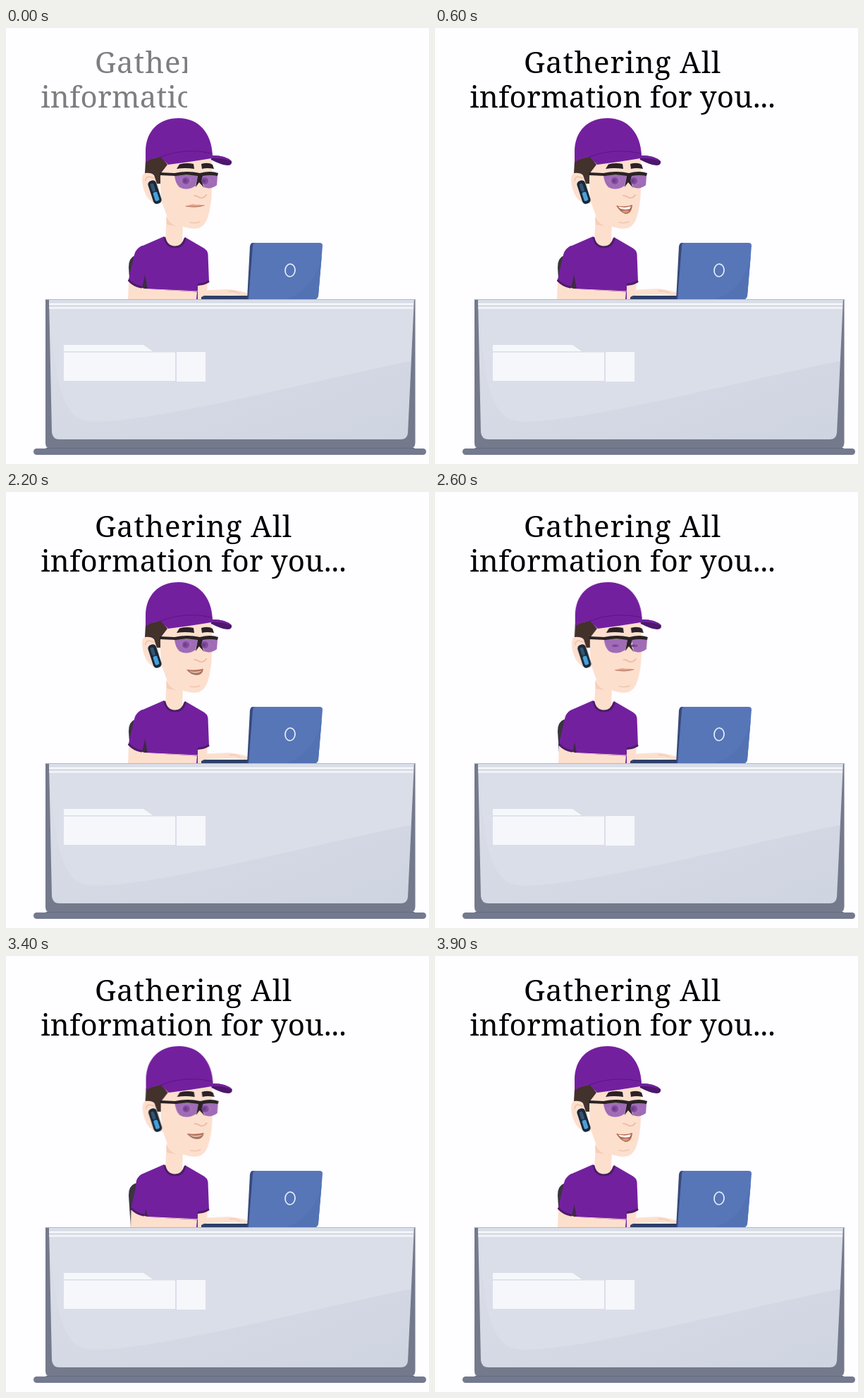
An HTML page without scripts for the animation above (4 s loop, 600 by 619 pixels).

```html
<!DOCTYPE html>
<html lang="en">
<head>
<meta charset="utf-8">
<title>Gathering information</title>
<style>
  html, body { margin: 0; width: 100%; height: 100%; overflow: hidden; background: #fefdff; }
  svg.stage { display: block; width: 600px; height: 619px; }
  .title { font: 42px "Noto Serif", serif; text-anchor: middle; fill: #000; animation: fade 4s infinite; }
  .wipe { animation: wipe 4s infinite; }
  .skin { fill: #fddfce; }
  .shade { fill: #f6cdb8; }
  .shirt { fill: #73209f; }
  .dark { fill: #2a2226; }
  .line { fill: none; stroke-linecap: round; }
  .hem { stroke: #4c1c66; stroke-width: 3; }
  .arm { animation: sway 4s linear infinite; }
  .head { animation: nod 4s linear infinite; }
  .fingers { animation: type .4s step-end infinite; }
  .eyes { transform-origin: 268px 219px; animation: blink 4s step-end infinite; }

  @keyframes wipe {
    0% { transform: translateX(-343px); animation-timing-function: steps(5); }
    12.5%, 100% { transform: none; }
  }
  @keyframes fade {
    0% { opacity: .5; animation-timing-function: steps(5); }
    12.5%, 100% { opacity: 1; }
  }
  @keyframes sway {
    0%, 55% { transform: none; }
    65% { transform: translateX(2px); }
    75%, 85% { transform: translateX(3.5px); }
    97.5% { transform: translateX(1px); }
  }
  @keyframes nod {
    0%, 55% { transform: none; }
    65%, 80% { transform: translateX(.8px); }
    97.5% { transform: none; }
  }
  @keyframes type { 50% { transform: translate(1px, -.7px); } }
  @keyframes blink { 62.5% { transform: scaleY(.35); } 67.5% { transform: none; } }
</style>
</head>
<body>
<svg class="stage" viewBox="0 0 600 619">
  <defs>
    <clipPath id="reveal"><rect class="wipe" width="600" height="130"/></clipPath>
    <linearGradient id="panel" x2="1" y2="1">
      <stop stop-color="#dadee8"/><stop offset="1" stop-color="#cfd4e1"/>
    </linearGradient>
    <path id="lenses" d="M239 209H272L269 224Q257 232 246 226Q240 220 239 209zM278 209H300L299 223Q290 230 281 226z"/>
    <g id="eye">
      <ellipse rx="9" ry="6" fill="#b78bc4"/>
      <circle r="5" fill="#7d4a98"/>
      <circle cx="-1" r="2.4" fill="#5d3078"/>
    </g>
  </defs>

  <g clip-path="url(#reveal)">
    <g class="title">
      <text x="266" y="64" letter-spacing="1">Gathering All</text>
      <text x="266" y="112.5" letter-spacing=".15">information for you...</text>
    </g>
  </g>

  <!-- chair and body -->
  <path fill="#393540" d="M183 323Q174 326 174 340L177 386H205V323z"/>
  <path class="skin" d="M228 266L226 302Q238 316 250 305L251 275z"/>
  <path class="shade" d="M227 268Q234 282 251 283L228 279z"/>
  <path class="skin" d="M271 360H286L284 385H270z"/>
  <path class="shirt" d="M224 296L192 310Q185 314 184 324L198 371L272 385V366L288 361L286.500 321Q286 315 278 311L254 297C253 306 248 310 240 310S226 305 224 296z"/>
  <path class="line hem" d="M225 298C227 307 232 311 240 311S252 306 254 299"/>
  <path class="line hem" d="M273 364Q281 364 287 360"/>
  <path fill="#3d2b45" d="M197 349L192 371H201z"/>

  <g class="arm">
    <path class="skin" d="M174 360L196 370L273 373.5L271 385H173z"/>
    <path class="shirt" d="M193 309Q184 313 182 322L173.500 359Q181 367 193 369L198 347L199 316z"/>
    <path class="line hem" d="M174.500 358.500Q181 366 192 368"/>
  </g>
  <path class="shirt" d="M198 371L272 374V385H270L198 372z"/>
  <path class="skin" d="M180 371L196 370.5L271 374.5L270 385H180z"/>
  <path fill="#2d3f6a" d="M277 382L281 380H346V385H277z"/>
  <g class="fingers">
    <path class="skin" d="M273 373L312 371Q325 371 341 376Q344 379 339 380L318 379L277 380z"/>
    <path class="line" stroke="#e9bea8" d="M316 374Q326 373 331 377"/>
  </g>

  <!-- head -->
  <g class="head">
    <path class="skin" d="M213 207Q199 200 194 209Q191 222 199 238Q207 251 221 249z"/>
    <path class="line" stroke="#efc0a9" stroke-width="1.5" d="M209 213Q199 208 198 217"/>
    <path class="skin" d="M217 186H292V225Q292 254 285 272Q279 286 265 285Q241 282 228 266L220 244z"/>
    <path fill="#43312b" d="M198 188L197 206Q206 205 210 209L214 221H219V207L229 194L220 182z"/>

    <path class="dark" d="M242 200L246 193.500Q256 191 266 193L267 200Q254 198 242 200zM277 193Q287 190 293 194L295 200Q285 198 278 200z"/>
    <path class="line" stroke="#efbfa8" stroke-width="2" d="M267 238Q273 239 275 241Q281 242 284 237"/>
    <path class="line" stroke="#f0c7b2" stroke-width="1.5" d="M261 276Q269 278 275 275"/>

    <!-- glasses -->
    <use href="#lenses" fill="#b384c1"/>
    <g class="eyes">
      <use href="#eye" x="255" y="217"/>
      <use href="#eye" x="282" y="217"/>
    </g>
    <use href="#lenses" fill="#8a50a8" opacity=".45"/>
    <path class="dark" d="M218 205L239 206Q257 202 275 206Q290 202 301 206L300 210Q289 208 279 210L277 217L281 227L274 219L269 226L272 210Q256 207 241 210L218 209z"/>

    <!-- mouth shapes side by side, one visible at a time -->
    <svg x="250" y="246" width="36" height="24">
      <g>
        <g>
          <path fill="#dfa48e" d="M5 7Q14 3 19 5Q25 4 31 6Q20 11 5 7z"/>
          <path class="line" stroke="#b97b68" d="M5 7Q19 9 31 6"/>
        </g>
        <g transform="translate(40)">
          <path fill="#b06a50" d="M7 6Q19 9 30 5Q29 18 20 18Q12 15 7 6z"/>
          <path fill="#fff" d="M10 7.500Q19 10 28 7L26 11Q18 13 12 10z"/>
          <path fill="#dc9480" d="M15 14Q20 12 26 14Q21 19 15 14z"/>
        </g>
        <g transform="translate(80)">
          <path fill="#b06a50" d="M6 6Q19 9 30 5Q30 19 20 19Q11 17 6 6z"/>
          <path fill="#fff" d="M9 7.500Q19 10 28 7L26 11Q18 13 11 10z"/>
          <path fill="#dc9480" d="M14 15Q20 12 26 15Q21 20 14 15z"/>
        </g>
        <g transform="translate(120)">
          <path fill="#b0705a" d="M6 6Q18 8 30 5Q29 14 20 14Q11 13 6 6z"/>
          <path fill="#d8bfb4" d="M10 8Q19 10 28 7.500Q25 11 19 11Q13 11 10 8z"/>
        </g>
        <animateTransform attributeName="transform" type="translate" calcMode="discrete" dur="4s" repeatCount="indefinite"
          values="0;-40;-120;-40;-120;-40;-80;-120;-40;0;-40;-120;-40;0;0;-120;-40;-120;-40;-40"/>
      </g>
    </svg>

    <!-- earpiece -->
    <g transform="translate(211 233) rotate(-18)">
      <rect x="-6" y="-17" width="12" height="34" rx="5" fill="#192839"/>
      <rect x="-3" y="-13" width="5" height="12" rx="2.5" fill="#355471"/>
      <rect x="-3" y="0" width="6" height="13" rx="2" fill="#48a0dc"/>
    </g>

    <!-- cap -->
    <path fill="#4c176d" d="M290 181Q311 180 320 189Q321 195 314 195Q304 194 291 187z"/>
    <path class="shirt" d="M198 191V176C198 146 217 128 245 128C273 128 292 149 293 181Q311 181 319 189Q304 184 292 185Q262 190 230 194L219 183Q208 184 198 191z"/>
    <path class="line" stroke="#59187c" d="M219 183Q254 169 292 178"/>
  </g>

  <!-- laptop -->
  <path fill="#38497a" d="M350 305H360L352 385H342L346 310Q347 305 350 305z"/>
  <path fill="#5776b8" d="M354 305H445Q449 305 449 309L443 380Q442 385 438 385H344L350 309Q350 305 354 305z"/>
  <path fill="#5372b4" d="M448 322Q439 370 398 385H438Q442 385 443 380z"/>
  <ellipse cx="403" cy="344" rx="7" ry="9" fill="none" stroke="#e9eefa" stroke-width="1.7" transform="rotate(5 403 344)"/>

  <!-- desk -->
  <path fill="#747a8b" d="M56 385H580.500V589Q580 597 573 597H63Q56 597 56 589z"/>
  <rect x="39" y="597" width="557" height="9" rx="4.5" fill="#737a8f"/>
  <path class="line" stroke="#666c7e" d="M57 596.5H579"/>
  <path fill="url(#panel)" d="M61 385H579L570 575Q569 584 560 584H76Q66 584 65 574z"/>
  <path fill="#dadee8" d="M62 399C70 495 76 559 125 559C220 558 430 502 574 473L578 385H61z"/>
  <path class="line" stroke="#b4b9c7" d="M56 385.5H580"/>
  <path class="line" stroke="#fafbfe" stroke-width="2" d="M62 392H577M62 397.5H577"/>
  <path fill="#f6f7fb" d="M82 450H195L208 459H82zM82 460.5H240V501H82zM242 460H283V502H242z"/>
</svg>
</body>
</html>
```
